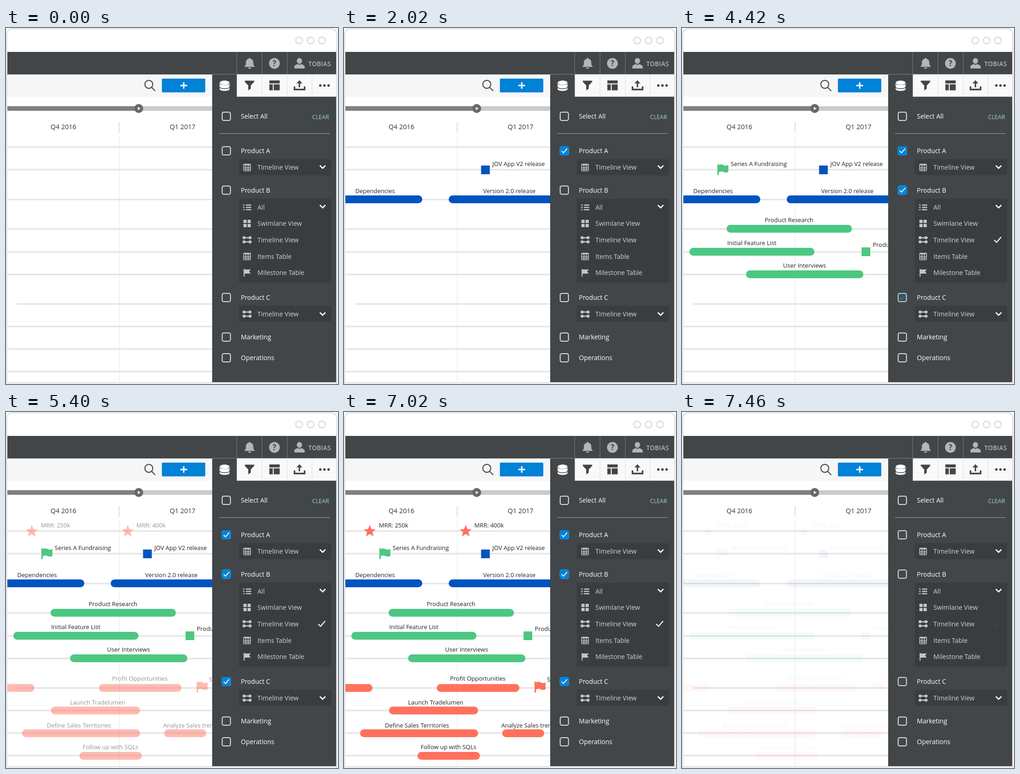
These frames come from a looping animation (723 by 774 pixels, 7800 ms). An HTML page:

```html
<!DOCTYPE html>
<html lang="en">
<head>
<meta charset="utf-8">
<title>Roadmap filter</title>
<style>
  html, body { margin: 0; width: 100%; height: 100%; overflow: hidden; background: #fff; }
  svg { display: block; width: 723px; height: 774px; font-family: "Open Sans", sans-serif; }
  .label { font-size: 13px; fill: #222; }
  .quarter { font-size: 14.4px; font-weight: 500; fill: #333; }
  .name { font-size: 14px; font-weight: 500; fill: #fff; }
  .view { font-size: 14px; fill: #cfd0d1; }
</style>
</head>
<body>
<svg viewBox="0 0 723 774">
  <defs>
    <g id="table" fill="none" stroke="#c4c5c6" stroke-width="1.4">
      <rect x="-7.5" y="-7" width="15" height="14.5" rx="1.5"/>
      <path d="M-7.5 -5.8H7.5" stroke-width="2.6"/>
      <path d="M-7.5 0H7.5M-7.5 3.8H7.5M-2.5 -5V7M2.5 -5V7"/>
    </g>
    <path id="list" d="M-8.5 -5h3m3 0H9M-8.5 0h3m3 0H9M-8.5 5h3m3 0H9" stroke="#c4c5c6" stroke-width="2.6"/>
    <path id="lanes" d="M-8 -8h7v7h-7zM1 -8h7v7h-7zM-8 1h7v7h-7zM1 1h7v7h-7z" fill="#c4c5c6"/>
    <g id="links" fill="#c4c5c6">
      <path d="M-6 -4.5H6M-6 4.5H6" stroke="#c4c5c6" stroke-width="2.4"/>
      <circle cx="-6.5" cy="-4.5" r="3.3"/><circle cx="6.5" cy="-4.5" r="3.3"/>
      <circle cx="-6.5" cy="4.5" r="3.3"/><circle cx="6.5" cy="4.5" r="3.3"/>
    </g>
    <path id="milestone" d="M-7.5 -8h2v1h13.5l-3.5 4.5 3.5 4.5H-5.500V8.500h-2z" fill="#c4c5c6"/>
    <path id="chevron" d="M-6 -3L0 3L6 -3" fill="none" stroke="#fff" stroke-width="2.6"/>
    <path id="tick" d="M-7.500 .500L-2.500 5.500L7.500 -6" fill="none" stroke="#fff" stroke-width="2.200"/>
    <path id="star" d="M0 -13.500L3.700 -4.300L13.200 -4.100L5.800 2.100L8.400 11.500L0 6.200L-8.400 11.500L-5.800 2.100L-13.200 -4.100L-3.700 -4.300Z"/>
    <path id="flag" d="M0 0h2.500V2C7 0 10 0 13.500 2S20 3.500 24 2V17C20 19 17 18.500 13 17S7 15.500 3 17.500V24H0Z"/>
  </defs>

  <rect width="723" height="774" fill="#fff"/>
  <path d="M3 101H449V150H3z" fill="#f6f6f6"/>
  <g fill="none" stroke="#4a4b4d" stroke-width="2.2">
    <circle cx="311" cy="122.500" r="8.700"/><path d="M317.300 129L325 137"/>
  </g>
  <rect x="339.500" y="110" width="94.500" height="30" rx="2" fill="#0082d6"/>
  <path d="M379.500 125H394.500M387 118V132" stroke="#fff" stroke-width="3"/>
  <path d="M289 170H449V180H289z" fill="#cbcbcb"/>
  <path d="M3 170H289V180H3z" fill="#808080"/>
  <circle cx="289" cy="175" r="9.700" fill="#686868"/>
  <path d="M287 171.500V178.500L293 175z" fill="#fff"/>
  <text x="97" y="220" class="quarter">Q4 2016</text>
  <text x="356.500" y="220" class="quarter">Q1 2017</text>
  <path d="M246.500 205V228" stroke="#d4d4d4" stroke-width="1.500"/>
  <path d="M246.500 235V770" stroke="#e6e6e6"/>
  <path id="rows" stroke="#e3e3e4" stroke-width="2.800"/>

  <g id="layers"></g>

  <path d="M3 52H720V101H3zM449 101H503V150H449zM449 150H720V770H449z" fill="#434648"/>
  <path d="M503 101H720V149.500H503z" fill="#f9f9f9"/>
  <path d="M502.500 52V101M557.500 52V101M612.500 52V101" stroke="#77797b"/>
  <path d="M557.500 101V149M612.500 101V149M666.500 101V149" stroke="#dcdcdc"/>
  <path d="M449 100.500H720M502.500 101V149.500H720" stroke="#85878a" fill="none"/>

  <g fill="#b4b5b6">
    <path d="M528.500 67a2 2 0 0 1 4 0C537 68 538.500 71 538.500 75C538.500 80 539.500 81.500 541.500 83.500V84.500H519.500V83.500C521.500 81.500 522.500 80 522.500 75C522.500 71 524 68 528.500 67zM527 86H534A3.500 2.500 0 0 1 527 86z"/>
    <circle cx="584.500" cy="77" r="11.700"/>
    <ellipse cx="639" cy="71.500" rx="5.700" ry="6.300"/>
    <path d="M628 88V84.500C628 81 632 79.500 635.500 78.500Q639 81 642.500 78.500C646 79.500 650.500 81 650.500 84.500V88z"/>
    <text x="658.500" y="82.500" font-size="13.500" font-weight="600" letter-spacing=".3">TOBIAS</text>
  </g>
  <text x="584.500" y="83" font-size="17" font-weight="700" text-anchor="middle" fill="#434648">?</text>

  <g fill="#fff" stroke="#434648" stroke-width="1.500">
    <path d="M464.500 129.500v3.500c0 6 23 6 23 0v-3.500z"/>
    <path d="M464.500 123.500v4c0 6 23 6 23 0v-4z"/>
    <ellipse cx="476" cy="119" rx="11.500" ry="5.500"/>
    <path d="M464.500 120v2c0 6 23 6 23 0v-2c0 5.500-23 5.500-23 0z" stroke="none"/>
  </g>
  <g fill="#434648">
    <path d="M520 114.500H540.500V117L533 125V132L527.500 135.500V125L520 117z"/>
    <path d="M573.500 114H596V120.500H573.500zM573.500 122.500H581V135.500H573.500zM583 122.500H596V135.500H583z"/>
    <path d="M639 113.500L645.500 120.500H640.600V129H637.400V120.500H632.500zM626.500 127H630V132H648.500V127H652V135.500H626.500z"/>
    <circle cx="684.500" cy="125" r="2.700"/><circle cx="693.500" cy="125" r="2.700"/><circle cx="702.500" cy="125" r="2.700"/>
  </g>

  <text x="666.500" y="197.500" font-size="12.500" fill="#93dccb">CLEAR</text>
  <path d="M464 229.500H705" stroke="#a2a4a5" stroke-width="1.200"/>
  <g fill="#3a3d3f">
    <rect x="507" y="285" width="201" height="35" rx="3"/>
    <rect x="507" y="371" width="201" height="183.500" rx="4"/>
    <rect x="507" y="604" width="201" height="34.500" rx="3"/>
  </g>
  <g id="menu"></g>
  <g id="checks"></g>

  <path d="M1.500 774V16Q1.500 1.500 16 1.500H706Q720.500 1.500 720.500 16V774M0 771.500H722" fill="none" stroke="#e4e4e5" stroke-width="3"/>
  <g fill="none" stroke="#e1e1e2" stroke-width="3">
    <circle cx="638.500" cy="27" r="7.300"/><circle cx="663.300" cy="27" r="7.300"/><circle cx="688" cy="27" r="7.300"/>
  </g>
</svg>
<script>
const $ = id => document.getElementById(id);
const label = (x, y, text, kind = 'label') => `<text x="${x}" y="${y}" class="${kind}">${text}</text>`;
const bar = (x1, x2, y) => `<rect x="${x1}" y="${y - 8.5}" width="${x2 - x1}" height="17" rx="8.5"/>`;
const square = (x, y) => `<rect x="${x}" y="${y}" width="19" height="19"/>`;
const use = (id, x, y) => `<use href="#${id}" x="${x}" y="${y}"/>`;

$('rows').setAttribute('d', [259, 308, 373, 437, 487, 536, 600, 649, 698, 747]
  .map(y => `M${y === 600 ? 24 : 3} ${y}H449`).join(''));

// Each product: when its box is ticked, when its items fade in, and what it shows.
const products = [
  { tick: 460, show: 1000, y: 267, color: '#0054bf', items:
    square(298.5, 299) + label(323, 300, 'JOV App V2 release') +
    '<path d="M1.5 364H162a8.500 8.500 0 0 1 0 17H1.500z"/>' + bar(228, 470, 372.5) +
    label(24.5, 359, 'Dependencies') + label(303, 359, 'Version 2.0 release') },
  { tick: 2400, show: 3000, y: 352.5, color: '#4dc782', extra: use('tick', 687.5, 460.5), items:
    use('flag', 77, 296) + label(106, 300, 'Series A Fundraising') +
    bar(97, 370, 436.5) + label(180, 421.5, 'Product Research') +
    bar(16, 288.5, 486.5) + label(98.5, 471.5, 'Initial Feature List') +
    square(391, 477) + label(415.5, 476, 'Product') +
    bar(139.5, 395, 535.5) + label(220, 521, 'User Interviews') },
  { tick: 4360, show: 5000, y: 586, color: '#ff705c', items:
    use('star', 56, 259) + label(76, 251, 'MRR: 250k') +
    use('star', 265, 259) + label(284, 251, 'MRR: 400k') +
    bar(-20, 62, 600) + bar(202, 382, 600) + label(231, 584, 'Profit Opportunities') +
    use('flag', 415, 586) + label(442, 586, 'Sales') +
    bar(98, 292, 649) + label(139.5, 635.5, 'Launch Tradelumen') +
    bar(35, 292, 698.5) + label(89, 685.5, 'Define Sales Territories') +
    bar(344.5, 436, 698.5) + label(342.5, 685.5, 'Analyze Sales trends') +
    bar(160, 296, 747.5) + label(167, 733, 'Follow up with SQLs') }
];

const names = [[192, 'Select All'], [267, 'Product A'], [352.5, 'Product B'],
  [586, 'Product C'], [672, 'Marketing'], [717, 'Operations']];
const views = [[303, 'table', 'Timeline View'], [390, 'list', 'All'], [425, 'lanes', 'Swimlane View'],
  [460.5, 'links', 'Timeline View'], [496.5, 'table', 'Items Table'],
  [532, 'milestone', 'Milestone Table'], [622, 'links', 'Timeline View']];

$('menu').innerHTML =
  names.map(([y, text]) => `<rect x="470.8" y="${y - 9}" width="18" height="18" rx="3.5"
    fill="none" stroke="#dcddde" stroke-width="2"/>` + label(511.5, y + 5, text, 'name')).join('') +
  views.map(([y, icon, text]) => use(icon, 525, y) + label(547.5, y + 5, text, 'view')).join('') +
  [302, 388, 621.5].map(y => use('chevron', 689.5, y)).join('');

$('layers').innerHTML = products.map(p => `<g fill="${p.color}">${p.items}</g>`).join('');
$('checks').innerHTML = products.map(p => `<g><rect x="469.8" y="${p.y - 10}" width="20" height="20"
  rx="3.5" fill="#0384da"/><use href="#tick" transform="translate(480 ${p.y}) scale(.8)"/>${p.extra || ''}</g>`).join('');

const clamp = v => Math.min(1, Math.max(0, v));
const smooth = v => v * v * (3 - 2 * v);

function draw(now) {
  const t = Math.floor(now % 7800 / 20) * 20;
  // The fade-out stops just short of empty and holds until the loop restarts.
  const remaining = 1 - smooth(clamp((Math.min(t, 7460) - 7000) / 530));
  products.forEach((p, i) => {
    $('checks').children[i].style.opacity = smooth(clamp((t - p.tick) / 240)) * remaining;
    $('layers').children[i].style.opacity = smooth(clamp((t - p.show) / 1020) ** 0.77) * remaining;
  });
  requestAnimationFrame(draw);
}
draw(0);
</script>
</body>
</html>
```
